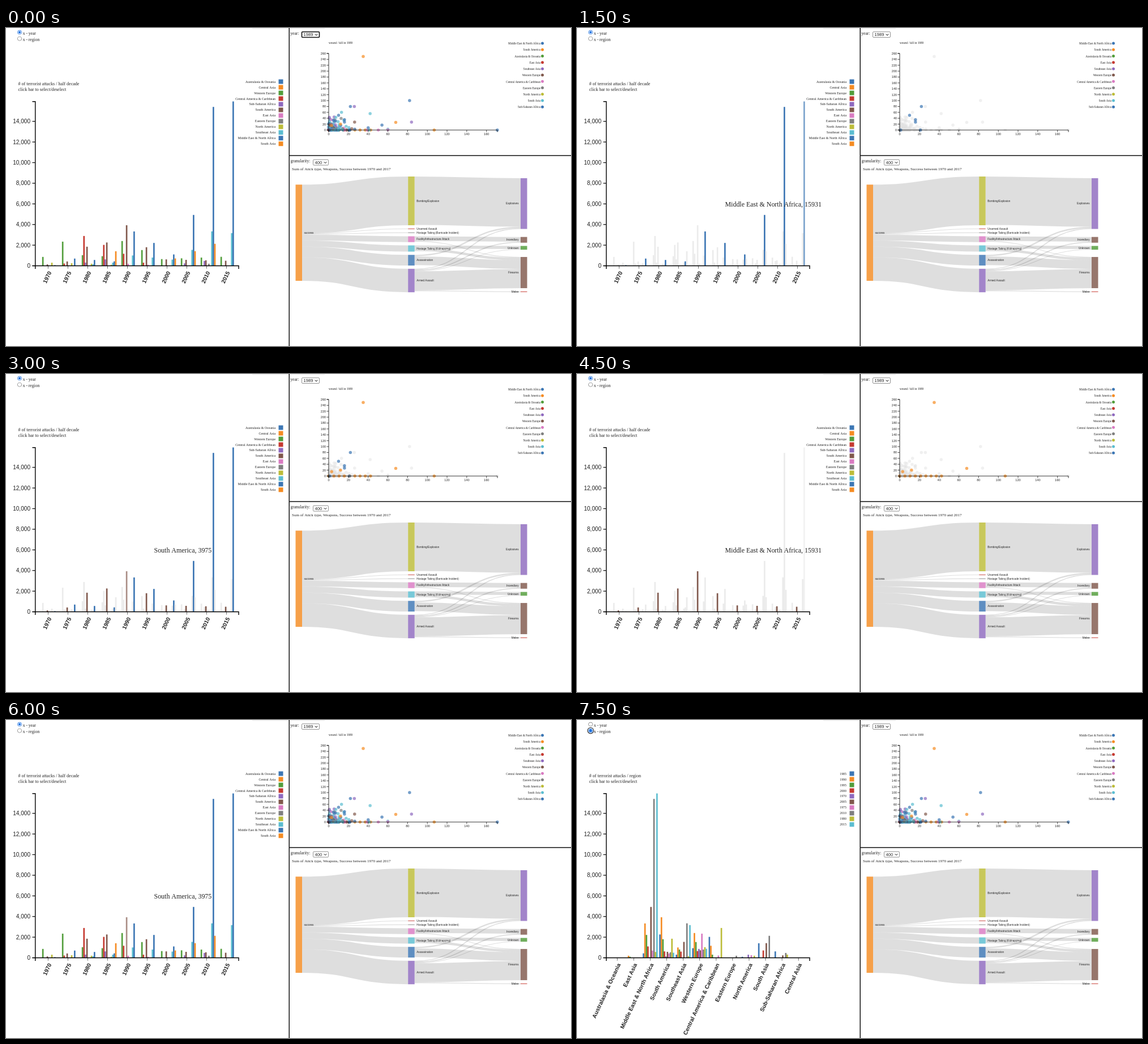
Recreate the animation shown at these times as an HTML page with a canvas. Size 998x561 px, loop 8 s.

```html
<!DOCTYPE html>
<html lang="en">
<head>
<meta charset="utf-8">
<title>Attack dashboard</title>
<style>
  html, body { margin: 0; width: 100%; height: 100%; overflow: hidden; background: #fff; }
  canvas { display: block; width: 998px; height: 561px; }
</style>
</head>
<body>
<canvas id="stage"></canvas>
<script>
const canvas = document.getElementById('stage');
const ctx = canvas.getContext('2d');
const ratio = window.devicePixelRatio || 1;
canvas.width = 998 * ratio;
canvas.height = 561 * ratio;

const SERIF = '"Liberation Serif", serif';
const SANS = '"Liberation Sans", sans-serif';
const COLORS = ['#3c76b4', '#f58b22', '#519d3a', '#c53930', '#8e69bf',
                '#80584c', '#d97bc2', '#7f7f7f', '#bcbc38', '#5bbdd0'];
const color = i => COLORS[i % 10];
const ME = 'Middle East & North Africa', SA = 'South America';

// Turning points of each region's attack count; the years between are interpolated
const TRENDS = {
  'Australasia & Oceania': { 1970: 0 },
  'Central Asia': { 1970: 0 },
  'Western Europe': { 1970: 860, 1975: 2340, 1980: 1030, 1985: 930, 1990: 2400, 2000: 650, 2015: 870 },
  'Central America & Caribbean': { 1970: 0, 1975: 220, 1980: 2890, 1995: 300, 2000: 0 },
  'Sub-Saharan Africa': { 1975: 0, 1985: 620, 1990: 0, 2000: 0, 2010: 470, 2015: 0 },
  [SA]: { 1970: 130, 1975: 420, 1980: 1850, 1985: 2260, 1990: 3930, 1995: 1800, 2000: 620, 2015: 490 },
  'East Asia': { 1985: 0, 1990: 200, 2000: 0 },
  'Eastern Europe': { 2005: 0, 2010: 200, 2015: 0 },
  'North America': { 1970: 300, 1980: 200, 1990: 0 },
  'Southeast Asia': { 1975: 0, 1985: 300, 1990: 1000, 2000: 600, 2005: 1540, 2010: 3340, 2015: 3170 },
  [ME]: { 1970: 60, 1975: 700, 1985: 430, 1990: 3330, 2000: 1100, 2005: 4930, 2010: 15400, 2015: 15931 },
  'South Asia': { 1980: 0, 1985: 1410, 1990: 0, 1995: 0, 2010: 2130, 2015: 0 }
};
const YEARS = Array.from({ length: 10 }, (_, i) => 1970 + 5 * i);
const REGIONS = Object.keys(TRENDS);
const REGION_AXIS = ['Australasia & Oceania', 'East Asia', ME, SA, 'Southeast Asia', 'Western Europe',
  'Central America & Caribbean', 'Eastern Europe', 'North America', 'South Asia', 'Sub-Saharan Africa', 'Central Asia'];
const YEAR_SERIES = [1985, 1990, 1995, 2000, 1970, 2005, 1975, 2010, 1980, 2015];
const SCATTER_REGIONS = [ME, SA, 'Australasia & Oceania', 'East Asia', 'Southeast Asia', 'Western Europe',
  'Central America & Caribbean', 'Eastern Europe', 'North America', 'South Asia', 'Sub-Saharan Africa'];

function attacks(region, year) {
  const points = Object.entries(TRENDS[region]).map(([y, n]) => [+y, n]);
  const next = points.findIndex(p => p[0] >= year);
  if (next < 0) return points.at(-1)[1];
  if (next === 0) return points[0][1];
  const [[y0, n0], [y1, n1]] = points.slice(next - 1, next + 1);
  return n0 + (n1 - n0) * (year - y0) / (y1 - y0);
}

const STATES = [
  { until: 1500, focus: true },
  { until: 3000, picked: [ME], hover: [ME, 2015], tip: ME + ', 15931' },
  { until: 4500, picked: [ME, SA], hover: [SA, 1990], tip: SA + ', 3975' },
  { until: 6000, picked: [SA], hover: [ME, 2015], tip: ME + ', 15931' },
  { until: 7500, hover: [SA, 1990], tip: SA + ', 3975' },
  { until: 8000, byRegion: true }
];

function text(str, x, y, size, family = SERIF, align = 'left', weight = '') {
  ctx.font = `${weight} ${size}px ${family}`;
  ctx.textAlign = align;
  ctx.fillStyle = '#222';
  ctx.fillText(str, x, y);
}
function rect(x, y, w, h, fill, alpha = 1) {
  ctx.globalAlpha = alpha;
  ctx.fillStyle = fill;
  ctx.fillRect(x, y, w, h);
  ctx.globalAlpha = 1;
}
function circle(x, y, r, fill, alpha = 1) {
  ctx.globalAlpha = alpha;
  ctx.fillStyle = fill;
  ctx.beginPath();
  ctx.arc(x, y, r, 0, 7);
  ctx.fill();
  ctx.globalAlpha = 1;
}
function line(points, width) {
  ctx.lineWidth = width;
  ctx.strokeStyle = '#000';
  ctx.beginPath();
  points.forEach(p => ctx.lineTo(...p));
  ctx.stroke();
}

function radio(y, label, on, focus) {
  if (focus) circle(24, y, 5.8, '#111');
  if (focus) circle(24, y, 4.8, '#fff');
  circle(24, y, 3.8, on ? '#1a6fe0' : '#767676');
  circle(24, y, 3.1, '#fff');
  if (on) circle(24, y, focus ? 2.6 : 2.1, '#1a6fe0');
  text(label, 29.7, y + 4, 7.6);
}
function select(x, y, w, label, focus) {
  ctx.beginPath();
  ctx.roundRect(x, y, w, 9.8, 1.5);
  ctx.lineWidth = focus ? 1.6 : 0.8;
  ctx.strokeStyle = focus ? '#111' : '#767676';
  ctx.stroke();
  text(label, x + 3, y + 7.7, 7.6, SANS);
  const cx = x + w - 5.5, cy = y + 4;
  line([[cx - 2.3, cy], [cx, cy + 2.3], [cx + 2.3, cy]], 1);
}

function drawBars(state) {
  const { byRegion, picked, hover = [] } = state;
  const groups = byRegion ? REGION_AXIS : YEARS;
  const series = byRegion ? YEAR_SERIES : REGIONS;
  const step = byRegion ? 29.1 : 35, left = byRegion ? 57.9 : 58.5;
  const width = 2.65, base = 419.5, scale = 0.0182;

  radio(7.5, 'x - year', !byRegion);
  radio(18.7, 'x - region', byRegion, byRegion);
  text('# of terrorist attacks / ' + (byRegion ? 'region' : 'half decade'), 21.5, 101, 8.07);
  text('click bar to select/deselect', 21.5, 110.5, 8.07);

  groups.forEach((group, g) => {
    series.forEach((item, s) => {
      const [region, year] = byRegion ? [group, item] : [item, group];
      const h = attacks(region, year) * scale;
      const active = !picked || picked.includes(region);
      const hovered = hover[0] === region && hover[1] === year;
      rect(left + g * step + s * width, base - h, width, h, active ? color(s) : '#ebebeb', hovered ? 0.68 : 1);
    });
    const center = left + g * step + series.length * width / 2;
    line([[center, base], [center, base + 5]], 0.6);
    ctx.save();
    ctx.translate(center, base);
    ctx.rotate(-65 * Math.PI / 180);
    text(group, -8, 10.5, 10, SANS, 'right', 'bold');
    ctx.restore();
  });

  line([[46.5, 129.8], [51.7, 129.8], [51.7, base], [46.5, base]], 1.4);
  line([[51.7, base + 5.5], [51.7, base], [411, base], [411, base + 5.5]], 1.4);
  for (let v = 0; v <= 14000; v += 2000) {
    const y = base - v * scale;
    line([[46.5, y], [51.7, y]], 1.2);
    text(v.toLocaleString('en-US'), 43, y + 3.5, 10.1, SANS, 'right');
  }
  series.forEach((name, i) => {
    rect(481.5, 90.6 + i * 9.97, 8, 8, color(i));
    text(name, 476, 96.6 + i * 9.97, 5.9, SERIF, 'right');
  });
  if (state.tip) text(state.tip, 261.5, 315, 11.95);
}

// Incidents as wounded (x), killed (y) and region index (k)
let seed = 11;
const random = () => (seed = seed * 16807 % 2147483647) / 2147483647;
const spread = mean => -Math.log(random()) * mean;
const CROWD = [9, 10, 9, 4, 9, 6, 10, 5, 9, 7];
const crowd = Array.from({ length: 125 }, () => {
  const x = Math.min(spread(10), 60);
  const y = random() < 0.3 ? 0 : Math.min(spread(16), 48) * (1 - x / 70);
  return { k: CROWD[Math.floor(random() * CROWD.length)], x, y };
});
const harmless = Array.from({ length: 9 }, (_, i) => ({ k: 1, x: i * 5.3, y: 0 }));
const outliers = [
  [1, 35, 250], [1, 68, 26], [1, 107, 0], [1, 3, 15], [1, 12, 20],
  [0, 22, 80], [0, 10, 50], [0, 16, 35], [0, 16, 27], [0, 1, 0], [0, 21, 0],
  [4, 26, 80], [4, 84, 27], [9, 42, 56], [9, 13, 60], [10, 82, 100], [10, 171, 0], [10, 54, 17]
].map(([k, x, y]) => ({ k, x, y }));
const incidents = [...harmless, ...crowd, ...outliers];

function drawScatter({ picked, focus }) {
  const px = v => 570 + v * 1.742, py = v => 180 - v * 0.5195;
  text('year:', 502.3, 11.5, 7.6);
  select(522.5, 6.7, 31, '1989', focus);
  text('wound / kill in 1989', 570, 28.3, 5.2);

  const active = p => !picked || picked.includes(SCATTER_REGIONS[p.k]);
  const dot = (p, fill, alpha) => circle(px(p.x), py(p.y), 2.75, fill, alpha);
  incidents.filter(p => !active(p)).forEach(p => dot(p, '#e2e2e2', 0.5));
  incidents.filter(active).forEach(p => dot(p, color(p.k), 0.7));

  line([[566.5, 44.8], [570, 44.8], [570, 180], [566.5, 180]], 0.8);
  line([[570, 183.5], [570, 180], [868, 180], [868, 183.5]], 0.8);
  for (let v = 0; v <= 260; v += 20) {
    line([[566.5, py(v)], [570, py(v)]], 0.7);
    text(v, 565.2, py(v) + 2, 5.6, SANS, 'right');
  }
  for (let v = 0; v <= 160; v += 20) {
    line([[px(v), 180], [px(v), 183.5]], 0.7);
    text(v, px(v), 189, 5.6, SANS, 'center');
  }
  SCATTER_REGIONS.forEach((name, i) => {
    const y = 27 + i * 11.22;
    circle(947.5, y, 2.5, color(i));
    text(name, 944, y + 2.2, 5.05, SERIF, 'right');
  });
}

// Outgoing flow widths per node; node heights and positions follow from them
const FLOWS = {
  success: { 'Bombing/Explosion': 86, 'Unarmed Assault': 1.1, 'Hostage Taking (Barricade Incident)': 1.1,
    'Facility/Infrastructure Attack': 10.3, 'Hostage Taking (Kidnapping)': 11, Assassination: 18.8, 'Armed Assault': 41.4 },
  'Bombing/Explosion': { Explosives: 85.5 },
  'Facility/Infrastructure Attack': { Incendiary: 8.3, Firearms: 1.2 },
  'Hostage Taking (Kidnapping)': { Unknown: 5.6, Firearms: 4.5 },
  Assassination: { Explosives: 2.4, Firearms: 15.5 },
  'Armed Assault': { Explosives: 1.6, Incendiary: 1.8, Unknown: 1, Firearms: 33.8, Melee: 1.2 }
};
const NODE_WIDTH = 11.5, GAP = 5.75;
const NODE_COLORS = { success: 1, 'Bombing/Explosion': 8, 'Unarmed Assault': 3, 'Hostage Taking (Barricade Incident)': 7,
  'Facility/Infrastructure Attack': 6, 'Hostage Taking (Kidnapping)': 9, Assassination: 0, 'Armed Assault': 4,
  Explosives: 4, Incendiary: 5, Unknown: 2, Firearms: 5, Melee: 3 };
const EXTRA_GAP = { Incendiary: 8.4, Firearms: 7.1 };
const nodes = {};

function addColumn(x, top, labels, leftSide) {
  let y = top;
  labels.forEach(label => {
    const incoming = Object.values(FLOWS).reduce((sum, targets) => sum + (targets[label] || 0), 0);
    const outgoing = Object.values(FLOWS[label] || {}).reduce((a, b) => a + b, 0);
    const h = Math.max(incoming, outgoing);
    y += EXTRA_GAP[label] || 0;
    nodes[label] = { x, y, h, leftSide };
    y += h + GAP;
  });
}
addColumn(511.5, 276.3, ['success']);
addColumn(710.2, 262, Object.keys(FLOWS.success));
addColumn(909, 265, ['Explosives', 'Incendiary', 'Unknown', 'Firearms', 'Melee'], true);

function drawFlows() {
  text('granularity:', 502.5, 237, 7.45);
  select(542.5, 232.2, 27, '400');
  text('Sum of Attck type, Weapons, Success between 1970 and 2017', 505, 251.2, 7);

  const arrived = {};
  ctx.strokeStyle = 'rgba(0, 0, 0, 0.13)';
  for (const [from, targets] of Object.entries(FLOWS)) {
    let sent = 0;
    for (const [to, width] of Object.entries(targets)) {
      const a = nodes[from], b = nodes[to], received = arrived[to] || 0;
      const x0 = a.x + NODE_WIDTH, mid = (x0 + b.x) / 2;
      const y0 = a.y + sent + width / 2, y1 = b.y + received + width / 2;
      sent += width;
      arrived[to] = received + width;
      ctx.lineWidth = width;
      ctx.beginPath();
      ctx.moveTo(x0, y0);
      ctx.bezierCurveTo(mid, y0, mid, y1, b.x, y1);
      ctx.stroke();
    }
  }
  for (const [label, { x, y, h, leftSide }] of Object.entries(nodes)) {
    rect(x, y, NODE_WIDTH, h, color(NODE_COLORS[label]), 0.82);
    text(label, leftSide ? x - 3.5 : x + 15, y + h / 2 + 1.7, 4.7, SANS, leftSide ? 'right' : 'left');
  }
}

function draw() {
  const time = performance.now() % 8000;
  const state = STATES.find(s => time < s.until);
  ctx.setTransform(ratio, 0, 0, ratio, 0, 0);
  rect(0, 0, 998, 561, '#fff');
  rect(435, 0, 128, 1.5, '#f1f1f1');
  drawBars(state);
  drawScatter(state);
  drawFlows();
  rect(499.5, 0, 1.5, 561, '#111');
  rect(500, 224.3, 498, 1.5, '#111');
  requestAnimationFrame(draw);
}
draw();
</script>
</body>
</html>
```
